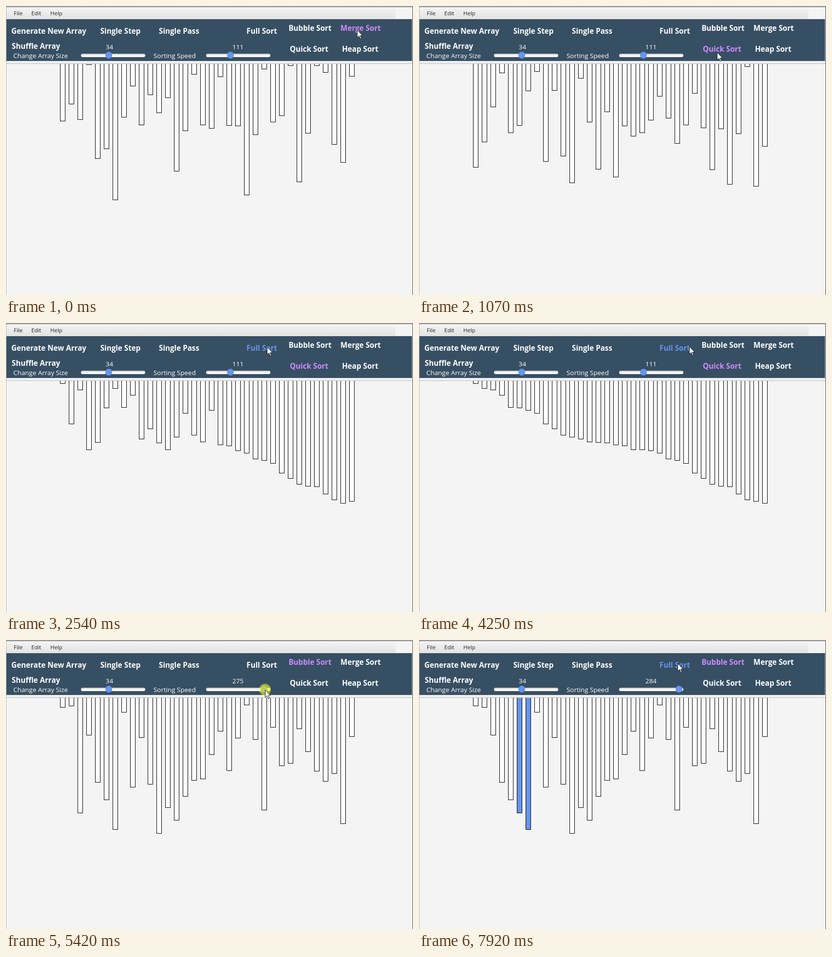
An HTML page for the animation above (8 s loop, 836 by 594 pixels).

```html
<!DOCTYPE html>
<html lang="en">
<head>
<meta charset="utf-8">
<title>Sorting visualizer</title>
<style>
  html, body { margin: 0; width: 100%; height: 100%; overflow: hidden; background: #f4f4f4; }
  svg { display: block; width: 836px; height: 594px; font: 13.4px "Open Sans", "Noto Sans", sans-serif; }
  #bars rect { stroke: #000; }
  #menu { font-size: 11.5px; fill: #222; }
  #labels { fill: #fff; }
  #buttons { font-size: 15.2px; font-weight: 700; text-anchor: middle; }
  .middle { text-anchor: middle; }
</style>
</head>
<body>
<svg viewBox="0 0 836 594">
  <defs>
    <linearGradient id="menuFill" x2="0" y2="1">
      <stop stop-color="#f6f6f6"/><stop offset="1" stop-color="#e2e2e2"/>
    </linearGradient>
    <linearGradient id="trackFill" x2="0" y2="1">
      <stop stop-color="#bcbcbc"/><stop offset=".4" stop-color="#f2f2f2"/><stop offset="1" stop-color="#fff"/>
    </linearGradient>
  </defs>
  <rect width="836" height="594" fill="#f4f4f4"/>
  <g id="bars"></g>

  <rect width="836" height="27" fill="url(#menuFill)"/>
  <rect x="800" y="2" width="34" height="24" fill="#f4f4f4"/>
  <rect y="26" width="836" height="93" fill="#f0f0f0"/>
  <rect x="1" y="27" width="833" height="86" fill="#374f63"/>
  <rect y="118" width="835" height="1" fill="#bcbcbc"/>
  <rect width="1" height="594" fill="#b4b4b4"/>
  <rect width="836" height="1" fill="#e8e8e8"/>
  <rect y="1" width="836" height="1" fill="#333"/>
  <rect x="835" y="1" width="1" height="593" fill="#444"/>

  <g id="menu">
    <text x="16" y="19">File</text><text x="52" y="19">Edit</text><text x="91" y="19">Help</text>
  </g>
  <g id="labels">
    <text x="15" y="107">Change Array Size</text>
    <text x="303" y="107">Sorting Speed</text>
    <text class="middle" x="212.5" y="89">34</text>
    <text class="middle" x="476.5" y="89" id="speed"></text>
  </g>
  <g id="buttons"></g>
  <rect x="154" y="98" width="132" height="7" rx="3.5" fill="url(#trackFill)"/>
  <rect x="411" y="98" width="132" height="7" rx="3.5" fill="url(#trackFill)"/>
  <circle cx="211" cy="101" r="7" fill="#6495ed"/>
  <circle id="thumb" cy="101" r="7" fill="#6495ed"/>

  <g id="pointer">
    <circle id="press" r="12" fill="#ff0" opacity=".55"/>
    <path d="M.5 .5V16L4.1 12.6 6.7 18.6 9 17.6 6.5 11.9H11.4Z" fill="#fff" stroke="#111" stroke-width=".9"/>
  </g>
</svg>
<script>
const LOOP = 8000, WHITE = "#fff", BLUE = "#6495ed", PURPLE = "#cf8aff";
const QUICK_AT = 610, BUBBLE_AT = 4700;          // algorithm chosen
const QUICK_START = 1732, QUICK_DELAY = 188;     // sort running
const BUBBLE_START = 7815, BUBBLE_DELAY = 16;
const DRAG_START = 5000;

// Bottom edge of every bar
const mergeArray = [236, 201, 233, 120, 313, 293, 398, 228, 164, 244, 182, 219, 188, 339, 256, 140, 244,
  251, 145, 245, 246, 388, 264, 129, 238, 225, 122, 361, 261, 122, 136, 284, 321, 144];
const quickArray = [331, 279, 207, 137, 260, 245, 174, 134, 319, 173, 308, 363, 148, 238, 335, 217, 351,
  246, 267, 260, 234, 185, 230, 282, 244, 179, 250, 336, 252, 366, 262, 124, 370, 288];
const bubbleArray = [138, 135, 355, 195, 292, 328, 389, 148, 302, 200, 296, 397, 344, 370, 321, 288, 285,
  235, 187, 268, 201, 133, 204, 349, 179, 258, 253, 182, 229, 269, 290, 274, 377, 198];

// Screen refreshes: [first, last, count]
const refreshes = [[0, 0, 1], [70, 750, 10], [920, 1690, 11], [1770, 1930, 3], [2160, 2310, 2], [2540, 2690, 2],
  [3090, 3240, 3], [3470, 3620, 2], [4250, 5020, 11], [5090, 5420, 5], [5790, 5870, 2], [6420, 6800, 2],
  [7440, 7920, 7]].flatMap(([first, last, count]) =>
    Array.from({ length: count }, (_, i) => first + (count > 1 ? (last - first) * i / (count - 1) : 0)));

// Pointer path: [time, x, y]
const path = [[0, 721, 49], [530, 620, 95], [750, 620, 95], [1070, 609, 95], [1150, 605, 94], [1500, 536, 52],
  [1770, 536, 52], [1850, 536, 49], [3020, 536, 49], [3240, 539, 49], [4180, 539, 49], [4480, 606, 46],
  [4710, 606, 46], [5020, 463, 102], [5420, 532, 102], [5790, 533, 102], [5870, 534, 102], [6420, 535, 102],
  [6800, 536, 102], [7360, 536, 102], [7680, 531, 48], [LOOP, 531, 48]];
const presses = [[450, QUICK_AT], [1540, 1800], [4560, BUBBLE_AT], [DRAG_START, 7400], [7660, BUBBLE_START]];

const $ = id => document.getElementById(id);
function add(parent, tag, attrs, text = "") {
  const el = document.createElementNS("http://www.w3.org/2000/svg", tag);
  for (const name in attrs) el.setAttribute(name, attrs[name]);
  el.textContent = text;
  return parent.appendChild(el);
}
const swap = (a, i, j) => { [a[i], a[j]] = [a[j], a[i]]; };

const buttons = [["Generate New Array", 88, 57], ["Shuffle Array", 61.5, 88], ["Single Step", 235, 57],
  ["Single Pass", 355.5, 57], ["Full Sort", 525.5, 57], ["Bubble Sort", 624.5, 51], ["Merge Sort", 728.5, 51],
  ["Quick Sort", 622.5, 94], ["Heap Sort", 727.5, 94]]
  .map(([name, x, y]) => ({ name, x, y, el: add($("buttons"), "text", { x, y }, name) }));
const bars = mergeArray.map((_, i) => add($("bars"), "rect", { x: 111.5 + 18 * i, y: 110.5, width: 10 }));

// Quick sort, all ranges of one depth partitioned together
function quickLevels(start) {
  const levels = [start];
  let ranges = [[0, start.length - 1]];
  while (ranges.length) {
    const a = [...levels.at(-1)];
    ranges = ranges.flatMap(([lo, hi]) => {
      let mid = lo;
      for (let j = lo; j < hi; j++) if (a[j] < a[hi]) swap(a, mid++, j);
      swap(a, mid, hi);
      return [[lo, mid - 1], [mid + 1, hi]].filter(([l, h]) => l < h);
    });
    levels.push(a);
  }
  return levels;
}
const levels = quickLevels(quickArray);

function bubbleSteps(start, count) {
  const a = [...start];
  for (let j = 0; j < count; j++) if (a[j] > a[j + 1]) swap(a, j, j + 1);
  return a;
}

const stepsSince = (t, start, delay) => Math.max(0, Math.floor((t - start) / delay));

function pointerAt(t) {
  const k = path.findIndex(p => p[0] > t);
  const [t0, x0, y0] = path[k - 1], [t1, x1, y1] = path[k];
  const u = (t - t0) / (t1 - t0);
  return [Math.round(x0 + (x1 - x0) * u), Math.round(y0 + (y1 - y0) * u)];
}

function draw(t) {
  const [px, py] = pointerAt(t);
  const steps = stepsSince(t, BUBBLE_START, BUBBLE_DELAY);
  let selected = "Merge Sort", values = mergeArray;
  if (t >= BUBBLE_AT) {
    selected = "Bubble Sort";
    values = bubbleSteps(bubbleArray, steps);
  } else if (t >= QUICK_AT) {
    selected = "Quick Sort";
    values = levels[Math.min(levels.length - 1, stepsSince(t, QUICK_START, QUICK_DELAY))];
  }

  bars.forEach((bar, i) => {
    bar.setAttribute("height", values[i] - 110);
    bar.setAttribute("fill", steps && (i === steps - 1 || i === steps) ? BLUE : WHITE);
  });

  for (const { name, x, y, el } of buttons) {
    const hovered = Math.abs(px - x) < name.length * 4 && py > y - 16 && py < y + 5;
    el.setAttribute("fill", name === selected ? PURPLE : hovered ? BLUE : WHITE);
  }

  const dragX = t < DRAG_START ? 463 : t < 6800 ? px : 536;
  $("thumb").setAttribute("cx", dragX - 2);
  $("speed").textContent = Math.round(275 + (dragX - 532) * 2.37);
  $("pointer").setAttribute("transform", `translate(${px} ${py})`);
  $("press").setAttribute("visibility", presses.some(([on, off]) => t >= on && t < off) ? "visible" : "hidden");
}

function tick() {
  const now = performance.now() % LOOP;
  draw(refreshes.findLast(time => time <= now));
  requestAnimationFrame(tick);
}
tick();
</script>
</body>
</html>
```
